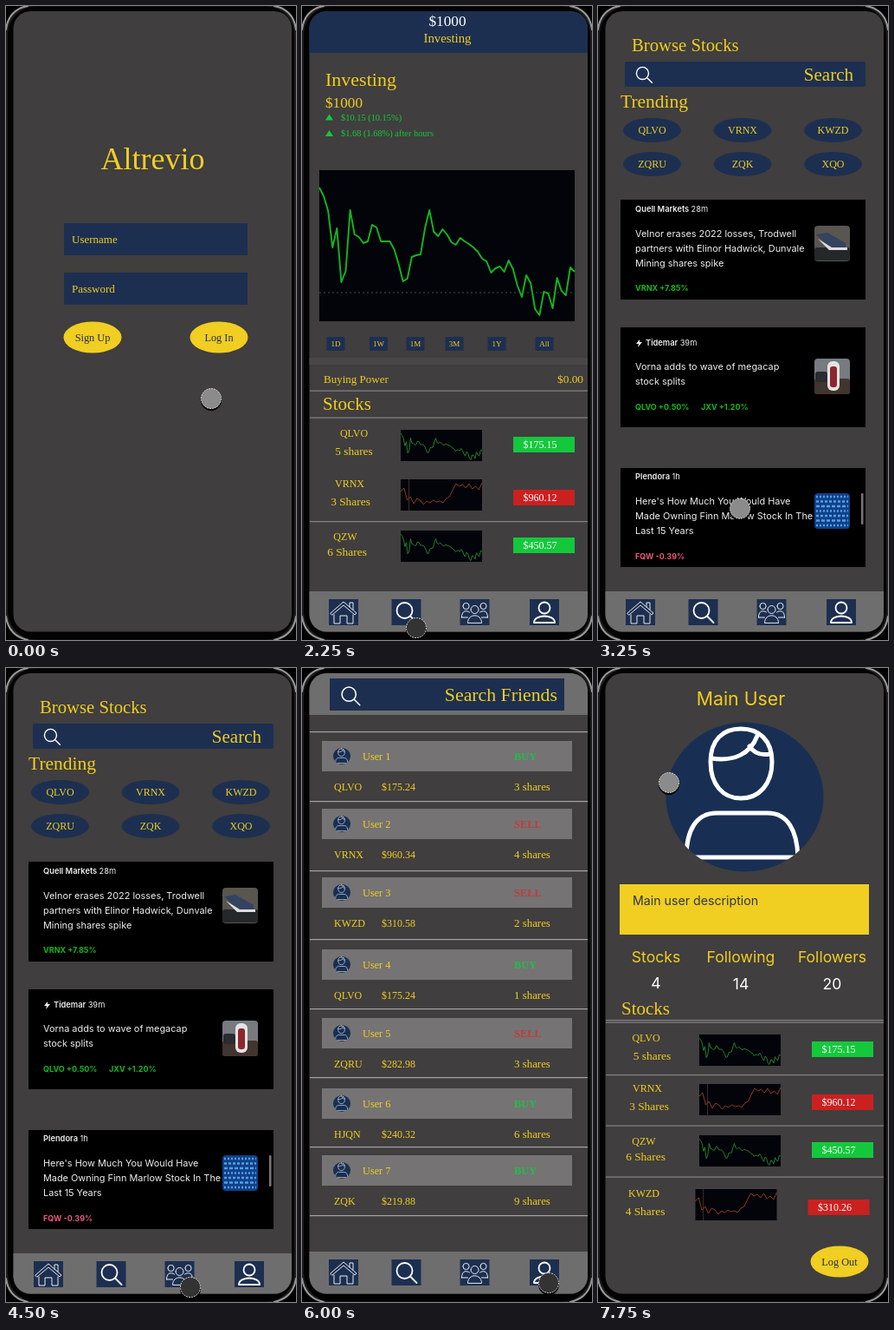
An HTML page that plays this animation: 335x730 px, repeating every 8 s.

```html
<!DOCTYPE html>
<html lang="en">
<head>
<meta charset="utf-8">
<style>
html, body { margin: 0; width: 100%; height: 100%; overflow: hidden; background: #000 }
svg { display: block; width: 335px; height: 730px }
text { font-family: "Noto Serif ExtraCondensed", "Liberation Serif", serif; fill: #f0ce22; white-space: pre }
.sans { font-family: Inter, sans-serif }
.line { fill: none; stroke: #fff; stroke-linecap: round; stroke-linejoin: round }
</style>
</head>
<body>
<svg id="stage" viewBox="0 0 335 730"></svg>
<script>
const BG = '#403e3e', NAVY = '#1d2f50', YELLOW = '#f0ce22', GREEN = '#14c83c', RED = '#cb2020', GREY = '#6f6e6e';

// Drawing helpers, all returning SVG markup
const rect = (x, y, w, h, fill, more = '') => `<rect x="${x}" y="${y}" width="${w}" height="${h}" fill="${fill}" ${more}/>`;
const oval = (x, y, rx, ry, fill) => `<ellipse cx="${x}" cy="${y}" rx="${rx}" ry="${ry}" fill="${fill}"/>`;
const text = (s, x, y, size, more = '') => `<text x="${x}" y="${y}" font-size="${size}" ${more}>${s}</text>`;
const mid = (s, x, y, size, more = '') => text(s, x, y, size, 'text-anchor="middle" ' + more);
const end = (s, x, y, size) => text(s, x, y, size, 'text-anchor="end"');
const sans = (s, x, y, size, fill, more = '') => text(s, x, y, size, `class="sans" style="fill:${fill}" ${more}`);
const rule = (y, color = '#858383') => rect(9, y, 321, 1.2, color);
const line = (d, width, more = '') => `<path class="line" d="${d}" stroke-width="${width}" ${more}/>`;
const fill = color => `style="fill:${color}"`;
const button = (s, x, y) => oval(x, y, 33.5, 18, YELLOW) + mid(s, x, y + 4.5, 12.3, fill('#25304a'));

// Icons, centred on 0,0
const ring = (x, y, r) => `M${x - r} ${y}a${r} ${r} 0 1 1 ${2 * r} 0a${r} ${r} 0 1 1 ${-2 * r} 0`;
const ICONS = {
  home: 'M-15 1L0 -12L15 1L13 3L0 -8L-13 3ZM-11 3V13H-4V4H4V13H11V3M7 -6V-11H11V-3',
  search: ring(-2, -2, 9) + 'M4.5 4.5L12 12',
  group: ring(0, -3, 4.5) + ring(-10, -7, 3.6) + ring(10, -7, 3.6) +
    'M-8 12C-8 1 8 1 8 12ZM-15 6C-15 -3 -9 -2 -6 0M15 6C15 -3 9 -2 6 0M-15 6H-8M15 6H8',
  user: ring(0, -5, 6.5) + 'M-12 12C-12 2 12 2 12 12Z'
};
const icon = (name, x, y, scale = 1, width = 1.4) =>
  line(ICONS[name], width, `transform="translate(${x} ${y}) scale(${scale})"`);
const nav = (dx, y) => rect(8, y - 24, 323, 50, GREY) +
  Object.keys(ICONS).map((name, i) => {
    const x = [48, 120.5, 199.5, 280][i] + dx;
    return rect(x - 17, y - 15, 34, 30, NAVY) + icon(name, x, y, 1, i % 2 ? 1.8 : .9);
  }).join('');

// Charts
const FALLING = [209, 219, 236, 278, 256, 318, 305, 235, 263, 266, 273, 271, 252, 255, 271, 271, 271, 280, 297, 317,
  314, 289, 287, 286, 256, 235, 260, 265, 257, 263, 272, 275, 267, 271, 274, 278, 283, 291, 294, 307, 302, 300, 306,
  293, 303, 322, 335, 310, 319, 349, 356, 329, 331, 348, 313, 328, 333, 301, 306].map(y => (y - 189) / 174);
const RISING = [14, 10, 24, 20, 28, 22, 24, 29, 25, 27, 24, 26, 25, 27, 22, 20, 12, 5, 8, 6, 10, 5, 11, 8, 12, 4]
  .map(y => y / 36);
const chart = (data, x, y, w, h, color, width) => rect(x, y, w, h, '#02040a') +
  `<polyline fill="none" stroke="${color}" stroke-width="${width}" stroke-linejoin="round" points="${
    data.map((v, i) => [x + i * w / (data.length - 1), y + v * h])}"/>`;

// One holding: chart corner, label centres and offsets, price
const holding = (x, y, name, nx, ny, shares, sx, sy, price, up) =>
  mid(name, nx, y + ny, 12) + mid(shares, sx, y + sy, 13.4) +
  (up ? chart(FALLING, x, y, 94, 36, '#2f9a35', .8)
      : chart(RISING, x, y, 94, 36, '#b04a25', .8) + rect(x + 9, y, .6, 36, '#6a4a3c')) +
  rect(x + 130, y + (up ? 8 : 12), 71, 18, up ? GREEN : RED) +
  mid(price, x + 161, y + (up ? 20.5 : 25), 12, fill('#fff'));

const login = mid('Altrevio', 169.5, 188, 36) +
  [['Username', 250], ['Password', 307]].map(([s, y]) => rect(67, y, 212, 37, NAVY) + text(s, 76, y + 23, 13)).join('') +
  button('Sign Up', 100, 381.5) + button('Log In', 246, 381.5);

const investing = rect(8, 5, 323, 49, NAVY) + mid('$1000', 168, 23, 17.2, fill('#fff')) + mid('Investing', 168, 42, 14.8) +
  text('Investing', 27, 92, 22) + text('$1000', 27, 117, 17.2) +
  [['$10.15 (10.15%)', 131.5], ['$1.68 (1.68%) after hours', 150]].map(([s, y]) =>
    `<path d="M27 ${y}h9l-4.5 -7z" fill="${GREEN}"/>` + text(s, 45, y, 10.4, fill(GREEN))).join('') +
  chart(FALLING, 20, 189, 295, 174, '#12b81c', 1.9) +
  '<path d="M20 330H315" stroke="#484b50" stroke-dasharray="2 3"/>' +
  [['1D', 39], ['1W', 88.5], ['1M', 131], ['3M', 176], ['1Y', 225], ['All', 280]].map(([s, x]) =>
    rect(x - 10.5, 381, 21, 16, NAVY) + mid(s, x, 392, 9)).join('') +
  rect(8, 405, 323, 8, '#484646') + text('Buying Power', 25, 434, 13) + end('$0.00', 325, 434, 13.3) +
  rule(442.5) + text('Stocks', 24, 465, 21) + rule(473.5) +
  holding(114, 488, 'QLVO', 60, 8, '5 shares', 60, 29, '$175.15', 1) +
  holding(114, 545, 'VRNX', 55, 9, '3 Shares', 56, 30, '$960.12', 0) + rule(593) +
  holding(114, 604, 'QZW', 50, 11, '6 Shares', 52, 29, '$450.57', 1) + nav(0, 698);

// News card: top, first baseline, text offsets, tickers
const news = (y, h, source, age, sx, sy, lines, ly, ticks, ty, color) => rect(26, y, 283, h, '#000') +
  sans(`${source} <tspan font-weight="400">${age}</tspan>`, sx, y + sy, 9.3, '#eee', 'font-weight="600"') +
  lines.map((s, i) => sans(s, 43, y + ly + i * 17.2, 10.9, '#eee')).join('') +
  ticks.map((s, i) => sans(s, 43 + 76 * i, y + ty, 9, color, 'font-weight="700"')).join('');
const thumb = (y, back, art) => rect(250, y, 41, 41, back, 'rx="4"') + art;

const browse = text('Browse Stocks', 39, 52, 20.7) + rect(31, 64, 278, 29, NAVY, 'rx="2"') +
  icon('search', 53, 79, .78, 1.8) + end('Search', 295, 86, 21) + text('Trending', 26, 117, 21.5) +
  ['QLVO', 'VRNX', 'KWZD', 'ZQRU', 'ZQK', 'XQO'].map((s, i) => {
    const x = [62.5, 167, 271.5][i % 3], y = i < 3 ? 143 : 182;
    return oval(x, y, 33.5, 14, NAVY) + mid(s, x, y + 4, 12);
  }).join('') +
  news(223, 115, 'Quell Markets', '28m', 43, 14, ['Velnor erases 2022 losses, Trodwell',
    'partners with Elinor Hadwick, Dunvale', 'Mining shares spike'], 43, ['VRNX +7.85%'], 105, '#14b81f') +
  thumb(253, '#59554f', rect(250, 278, 41, 15, '#25282a', 'rx="3"') +
    '<path d="M252 263L265 261L286 273V278H268Z" fill="#34435f"/><path d="M254 268L270 278H288V281H267Z" fill="#ddd"/>') +
  news(370, 115, 'Tidemar', '39m', 55, 21, ['Vorna adds to wave of megacap', 'stock splits'], 49,
    ['QLVO +0.50%', 'JXV +1.20%'], 95, '#14b81f') +
  '<path d="M48 384L44 389H47L46 393L51 387H48Z" fill="#eee"/>' +
  thumb(406, '#777b80', rect(250, 429, 41, 18, '#41352f', 'rx="3"') + rect(251, 421, 14, 12, '#292c32', 'rx="3"') +
    rect(265, 409, 14, 34, '#e4e4e4', 'rx="6"') + rect(268, 415, 8, 24, '#8c2730', 'rx="3"')) +
  news(532, 114, 'Plendora', '1h', 43, 13, ["Here's How Much You Would Have", 'Made Owning Finn Marlow Stock In The',
    'Last 15 Years'], 42, ['FQW -0.39%'], 105, '#e8587a') +
  thumb(561, '#123f88', [0, 1, 2, 3, 4, 5, 6].map(i =>
    `<path d="M252 ${565 + i * 5.5}H289" stroke="#4ba4e8" stroke-width="2.5" stroke-dasharray="${2 + i % 3} 2"/>`).join('')) +
  rect(304, 561, 2.5, 36, '#777', 'rx="1"') + nav(1, 698);

// Person portrait inside a 182 x 172 oval
const portrait = oval(169.5, 148.5, 91, 86, '#182f53') + line(
  'M165 70C186 70 201 83 201 108C201 134 186 150 165 150C144 150 130 134 130 108C130 83 144 70 165 70Z' +
  'M131 104C157 108 176 99 184 78M175 90C180 98 188 101 199 99' +
  'M102 218C102 186 114 167 137 167H196C219 167 230 187 231 218Z', 5, 'clip-path="url(#face)"');

const TRADES = [['QLVO', 175.24, 3, 1], ['VRNX', 960.34, 4, 0], ['KWZD', 310.58, 2, 0], ['QLVO', 175.24, 1, 1],
  ['ZQRU', 282.98, 3, 0], ['HJQN', 240.32, 6, 1], ['ZQK', 219.88, 9, 1]];
const friends = rect(8, 5, 323, 49, GREY) + rect(32, 12, 271, 37, NAVY) + icon('search', 56, 32, .9, 1.7) +
  end('Search Friends', 295, 38, 21.8) +
  TRADES.map(([name, price, count, buy], i) => {
    const y = [84, 162, 241, 324, 403, 484, 561][i];
    return rect(23, y, 289, 35, '#757373') +
      `<g transform="translate(${46 - 169.5 * .11} ${y + 17.5 - 148.5 * .11}) scale(.11)">${portrait}</g>` +
      text('User ' + (i + 1), 70, y + 21.5, 12.3) +
      text(buy ? 'BUY' : 'SELL', 245, y + 22, 12.4, fill(buy ? '#22bd4a' : '#c33b3b') + ' font-weight="600"') +
      text(name, 37, y + 56.5, 12) + text('$' + price, 92, y + 56.5, 12) + text(count + ' shares', 245, y + 56.5, 12.9);
  }).join('') +
  [73, 153, 233, 312, 392, 471, 551, 630].map(y => rule(y, '#a5a3a3')).join('') + nav(0, 696);

const profile = sans('Main User', 165, 43, 21.3, YELLOW, 'text-anchor="middle"') + portrait +
  rect(25, 249, 288, 58, YELLOW) + sans('Main user description', 40, 273, 14.2, '#303648') +
  [['Stocks', 67, 4, 368.5], ['Following', 165, 14, 370], ['Followers', 270.5, 20, 370]].map(([s, x, n, y]) =>
    sans(s, x, 339, 17.6, YELLOW, 'text-anchor="middle"') + sans(n, x, y, 17.6, '#fff', 'text-anchor="middle"')).join('') +
  text('Stocks', 27, 399, 21) + [405, 407.5, 468, 526.5, 585.5].map(y => rule(y)).join('') +
  holding(117, 422, 'QLVO', 55.5, 8, '5 shares', 62.5, 29, '$175.15', 1) +
  holding(117, 479, 'VRNX', 57, 9, '3 Shares', 59, 30, '$960.12', 0) +
  holding(117, 538, 'QZW', 53, 11, '6 Shares', 55, 29, '$450.57', 1) +
  holding(112.5, 600, 'KWZD', 53, 9, '4 Shares', 54.5, 30, '$310.26', 0) + button('Log Out', 279, 683.5);

const pages = [login, investing, browse, friends, profile];
const stage = document.getElementById('stage');
stage.innerHTML = `<defs>
  <clipPath id="screen">${rect(8.5, 6, 321.5, 714.5, '#000', 'rx="20"')}</clipPath>
  <clipPath id="face">${oval(169.5, 148.5, 91, 86, '#000')}</clipPath></defs>` +
  rect(0, 0, 335, 730, '#000') + rect(.5, -1, 334, 732, '#030303', 'rx="34" stroke="#1e1e1e" stroke-width="3"') +
  line('M0 27Q3 4 25 0M335 27Q332 4 310 0M0 703Q3 725 25 730M335 703Q332 725 310 730', 2, 'style="stroke:#999"') +
  `<g clip-path="url(#screen)">${pages.map(p =>
    `<g class="page">${rect(8, 5, 323, 717, BG) + p}<rect class="dim" x="8" y="5" width="323" height="717"/></g>`).join('')}</g>
  <g id="cursor"><circle cx="0" cy="2" r="12"/><circle id="dot" r="11.5" stroke="#ddd" stroke-width=".9" stroke-dasharray="2 1"/></g>`;
const layers = [...stage.querySelectorAll('.page')];
const dims = [...stage.querySelectorAll('.dim')];
const cursor = document.getElementById('cursor'), dot = document.getElementById('dot');

const LOOP = 8000, STEP = 250, SLIDE = 300;
const STARTS = [-SLIDE, 422, 2422, 4672, 6172];
// Pointer path: time, x, y
const PATH = [[0, 237, 452], [250, 260, 395], [1000, 260, 395], [1250, 142, 518], [1500, 75, 610], [2250, 132, 716],
  [2750, 132, 716], [3500, 180, 510], [4000, 190, 560], [4500, 213, 713], [4750, 213, 713], [5000, 192, 528],
  [5500, 225, 580], [6000, 285, 708], [6500, 296, 713], [7000, 220, 460], [7750, 82, 132]];
const PRESSES = [250, 2250, 4500, 6000];

const slide = (i, t) => {
  if (i >= STARTS.length) return 0;
  const u = Math.min(1, Math.max(0, (t - STARTS[i]) / SLIDE));
  return 1 - (1 - u) ** 2;
};

function pointer(t) {
  const i = Math.max(1, PATH.findIndex(p => p[0] >= t));
  const [t0, x0, y0] = PATH[i - 1], [t1, x1, y1] = PATH[i];
  const u = (t - t0) / (t1 - t0);
  return [x0 + (x1 - x0) * u, y0 + (y1 - y0) * u];
}

function draw(now) {
  const t = Math.floor(now % LOOP / STEP) * STEP;
  layers.forEach((layer, i) => {
    const shown = slide(i, t), left = slide(i + 1, t);
    layer.setAttribute('visibility', shown > 0 && left < 1 ? 'visible' : 'hidden');
    layer.setAttribute('transform', `translate(${322 * (1 - shown) - 80 * left} 0)`);
    dims[i].setAttribute('opacity', .42 * left);
  });
  cursor.setAttribute('transform', `translate(${pointer(t)})`);
  dot.setAttribute('fill', PRESSES.includes(t) ? '#333' : '#8b8b8b');
  requestAnimationFrame(draw);
}
draw(0);
</script>
</body>
</html>
```
